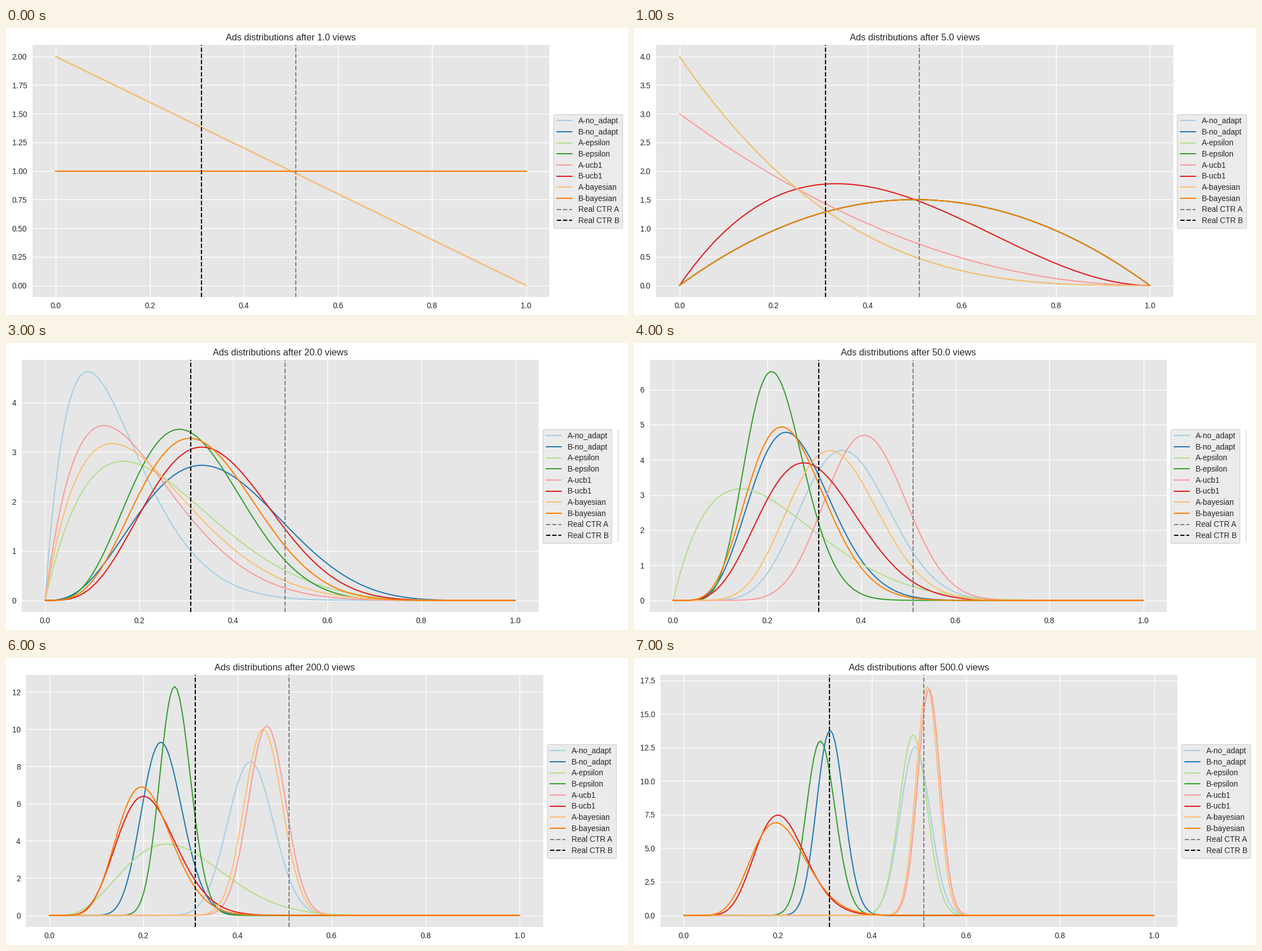
A matplotlib script that plays this animation: 1101x509 px, repeating every 8 s.

```python
import math

import matplotlib.pyplot as plt
import numpy as np
from matplotlib.animation import FuncAnimation
from matplotlib.lines import Line2D

W, H, DPI = 1101, 509, 100
K = 0.984  # scales point sizes to the stage
AX_W, AX_BOTTOM, AX_H = 915.6, H - 476.8, 446.4
MARGIN, DIGIT_W = 20, 7.6  # left margin and tick digit width, in pixels

plt.rcParams.update({
    "font.family": "Liberation Sans",
    "font.size": 10 * K,
    "axes.titlesize": 12 * K,
    "axes.titlepad": 6 * K,
    "axes.facecolor": "0.9",
    "axes.grid": True,
    "axes.axisbelow": True,
    "grid.color": "white",
    "grid.linewidth": K,
    "legend.labelspacing": 0.414,
    "lines.linewidth": 1.5 * K,
    "lines.solid_capstyle": "round",
    "patch.linewidth": K,
    "text.color": "0.15",
    "xtick.color": "0.15",
    "ytick.color": "0.15",
    "xtick.major.size": 0,
    "ytick.major.size": 0,
    "xtick.major.pad": 7 * K,
    "ytick.major.pad": 7 * K,
})
for side in ("left", "right", "top", "bottom"):
    plt.rcParams[f"axes.spines.{side}"] = False

VIEWS = [1, 5, 10, 20, 50, 100, 200, 500]
PALETTE = plt.get_cmap("Paired").colors

# Key points {total views: views given to ad A}; ad B gets the rest.
SHARE_A = {
    "no_adapt": {1: 1, 10: 7, 20: 11, 100: 49, 200: 103, 500: 246},
    "epsilon": {1: 1, 10: 6, 20: 6, 100: 9, 200: 16, 500: 283},
    "ucb1": {1: 1, 10: 5, 20: 8, 100: 73, 200: 160, 500: 445},
    "bayesian": {1: 1, 10: 6, 20: 7, 100: 54, 500: 454},
}
# Key points {views of an ad: clicks}, shared by all strategies.
CLICKS = {
    "A": {3: 0, 5: 1, 11: 1, 16: 4, 49: 22, 73: 33, 103: 44, 154: 70,
          160: 74, 246: 121, 283: 138, 445: 232, 454: 235},
    "B": {0: 0, 2: 1, 5: 1, 9: 3, 14: 4, 46: 9, 91: 20, 97: 23,
          184: 49, 254: 79},
}

X = np.linspace(0, 1, 200)


def along(points, x):
    return np.interp(x, list(points), list(points.values()))


def posterior(clicks, views):
    """Beta density of the click rate under a uniform prior."""
    scale = float((views + 1) * math.comb(views, clicks))
    return scale * X**clicks * (1 - X)**(views - clicks)


def label_width():
    """Width in pixels of the widest y tick label."""
    low, high = ax.get_ylim()
    ticks = [t for t in ax.get_yticks() if low <= t <= high]
    labels = ax.yaxis.get_major_formatter().format_ticks(ticks)
    return max(DIGIT_W * (len(s) - s.count(".") / 2) for s in labels)


fig = plt.figure(figsize=(W / DPI, H / DPI), dpi=DPI, facecolor="white")
ax = fig.add_axes([0, AX_BOTTOM / H, AX_W / W, AX_H / H])

# thin edge that stays beside the legend while it sits furthest left
edge = Line2D([1083.4 / W] * 2, [1 - 352 / H, 1 - 154 / H], color="0.83",
              lw=0.9, transform=fig.transFigure)
fig.add_artist(edge)


def draw(i):
    total = VIEWS[i]
    ax.clear()
    colors = iter(PALETTE)
    for strategy, share in SHARE_A.items():
        n_a = int(along(share, total))
        for ad, n in (("A", n_a), ("B", total - n_a)):
            clicks = round(along(CLICKS[ad], n))
            ax.plot(X, posterior(clicks, n), color=next(colors),
                    label=f"{ad}-{strategy}")
    ax.axvline(0.51, color="gray", ls="--", label="Real CTR A")
    ax.axvline(0.31, color="black", ls="--", label="Real CTR B")
    ax.set_title(f"Ads distributions after {total:.1f} views")
    ax.legend(loc="center left", bbox_to_anchor=(1, 0.5))

    left = MARGIN + label_width()
    ax.set_position([left / W, AX_BOTTOM / H, AX_W / W, AX_H / H])
    edge.set_visible(left < 30)
    return []


anim = FuncAnimation(fig, draw, frames=len(VIEWS), init_func=lambda: [],
                     interval=1000, repeat=True, repeat_delay=0)
plt.show()
```
